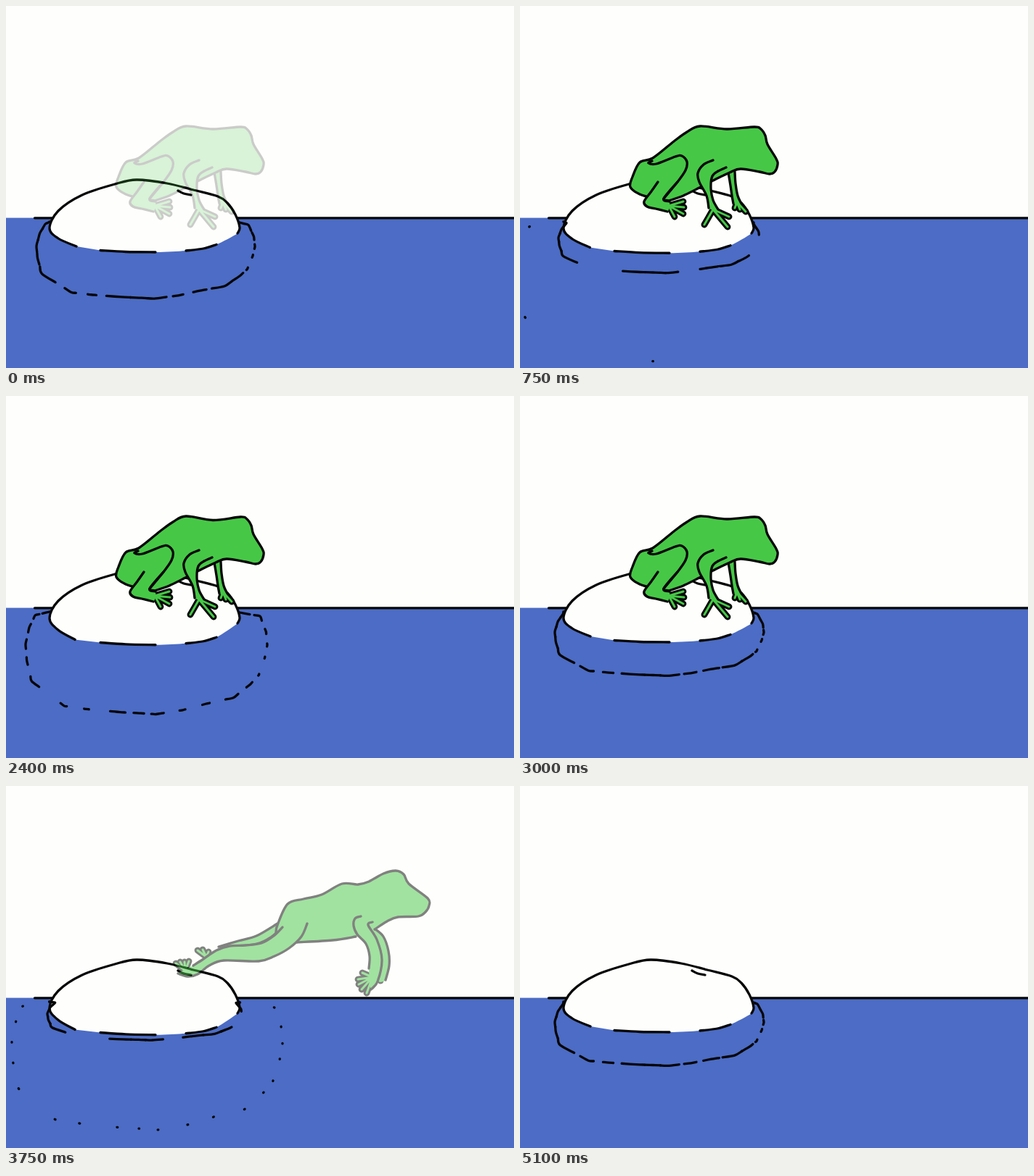
These frames come from a looping animation (700 px wide and 500 px high, 5.25 s). An HTML page:

```html
<!DOCTYPE html>
<html lang="en">
<head>
<meta charset="utf-8">
<title>Frog on a rock</title>
<style>
  html, body { margin: 0; width: 100%; height: 100%; overflow: hidden; background: #fefefc; }
  svg { display: block; width: 700px; height: 500px; }
  path { stroke-linecap: round; stroke-linejoin: round; }
  .ink, .toe, .core { fill: none; stroke: #060606; stroke-width: 3.3; }
  .skin { fill: #46c846; }
  .toe { stroke-width: 8.8; }
  .core { stroke: #46c846; stroke-width: 3; }
</style>
</head>
<body>
<svg id="stage" viewBox="0 0 700 500"></svg>
<script>
const STEP = 150, STEPS = 35, WAVES = 7, TAKEOFF = 24;
const stage = document.getElementById('stage');

function add(parent, tag, attrs = {}) {
  const el = document.createElementNS('http://www.w3.org/2000/svg', tag);
  for (const key in attrs) el.setAttribute(key, attrs[key]);
  return parent.appendChild(el);
}

const points = text => text.trim().split(/\s+/).map(s => s.split(',').map(Number));
const mix = (a, b, t) => a.map((v, i) => v + (b[i] - v) * t);

// Smooth open curve through a list of points.
function curve(p) {
  const at = i => p[Math.max(0, Math.min(p.length - 1, i))];
  let d = 'M' + p[0];
  for (let i = 0; i < p.length - 1; i++) {
    const [a, b, c, e] = [at(i - 1), at(i), at(i + 1), at(i + 2)];
    const h1 = b.map((v, k) => v + (c[k] - a[k]) / 6);
    const h2 = c.map((v, k) => v - (e[k] - b[k]) / 6);
    d += `C${h1} ${h2} ${c}`;
  }
  return d;
}

const ink = (g, p) => add(g, 'path', { class: 'ink', d: curve(p) });
const skin = (g, p) => add(g, 'path', { class: 'skin', d: curve(p) + 'Z' });

// Two edges running from the body outwards, ending in a fan of toes.
function limb(g, edgeA, edgeB, wrist, tips) {
  const a = points(edgeA), b = points(edgeB);
  const fan = points(tips).map(tip => `M${wrist}L${tip}`).join('');
  add(g, 'path', { class: 'toe', d: fan });
  skin(g, [...a, ...b.slice().reverse()]);
  ink(g, a);
  ink(g, b);
  add(g, 'path', { class: 'core', d: fan });
}

// Sea and horizon
add(stage, 'rect', { y: 292.6, width: 700, height: 208, fill: '#4c6cc5' });
add(stage, 'path', { class: 'ink', d: 'M39.5 292.8H702' });

function rock(g, wave) {
  const sink = 5 * Math.cos((wave - 3) * Math.PI / 6) ** 2;
  const top = points(`${97 - sink / 2},${332 + sink * 1.2} 72,${321 + sink * .6} 60,307
    72,283 105,261 150,246 180,240 222,245 258,254 292,263 305,272 316,288 322,306 319,314`);
  const middle = points(`206,${340 + sink} 165,${339.5 + sink * .9} 130,${337.5 + sink * .8}`);
  const right = points(`290,${329.5 + sink} 272,${335 + sink} 248,${338 + sink}`);
  add(g, 'path', { d: curve([...top, ...right, ...middle]) + 'Z', fill: '#fefefc' });
  [top, middle, right, points('237,255 245,259 255,261')].forEach(p => ink(g, p));
}

// Ring outline from the rock's left edge round to its right edge:
// across (-1..1), depth (0..1), and how long its dash lasts.
const ringShape = points(`-.92,.04,1 -.97,.16,1 -1,.32,1 -.99,.48,.7 -.95,.68,.8 -.68,.92,.4
  -.5,.95,.3 -.22,.98,1 -.06,.99,1 .08,1,1 .3,.96,.4 .49,.9,.5 .72,.84,1 .86,.71,.8
  .93,.62,.2 .98,.45,.2 1,.33,.4 .99,.2,.6 .94,.05,1`);

// Dashes shorten to dots as the ring widens.
function ring(g, age) {
  const half = 134 + 4 * age + age * age / 2, depth = 54 + 17.7 * age;
  const marks = ringShape.map(([u, v, w]) => [[191 + age / 2 + u * half, 297 + v * depth], w]);
  marks.unshift([[60, 298], 2]);
  marks.push([[322, 299], 2]);
  marks.forEach(([p, weight], i) => {
    if (age < 2 && weight < .5) return;
    if (age > 7 && (i > 9 || i % 4 !== 1)) return;
    const reach = Math.max(.01, Math.min(.5, weight * (7 - age) / 7));
    const before = marks[i - 1] || marks[i], after = marks[i + 1] || marks[i];
    ink(g, [mix(p, before[0], reach), p, mix(p, after[0], reach)]);
  });
}

const waves = Array.from({ length: WAVES }, (_, wave) => {
  const g = add(stage, 'g');
  rock(g, wave);
  for (let age = (wave + 3) % WAVES; age <= 8; age += WAVES) ring(g, age);
  return g;
});

function sittingFrog(sag) {
  const g = add(stage, 'g');
  limb(g, '287,230 290,248 292,262 294,273', '296,229 297,245 300,262 305,273',
    [299, 271], '296,279 303,281 311,284');
  const body = points(`205,269 186,266 165,260 152,250 155,236 165,216 183,210 212,187
    230,174 248,166 285,${170 + sag} 323,167 332,170 338,179 341,191 353,211 355,219 351,229
    344,232 330,229 304,225 289,230 270,239 247,251 225,262 205,269`);
  skin(g, body);
  ink(g, body);
  limb(g, '190,243 181,256 171,270 175,277 187,280 203,284', '217,243 198,266 206,270',
    [205, 276], '225,270 226,278 225,287 213,291');
  ink(g, points('182,214 177,217 188,218 214,208 223,207 230,215 228,227 217,243 198,266'));
  limb(g, '266,213 253,219 245,231 247,243 257,262 260,279', '284,223 273,228 265,235 263,251 266,268 273,281',
    [266, 281], '254,302 286,305 288,291');
  return g;
}

function leapingFrog() {
  const g = add(stage, 'g');
  limb(g, '374,190 345,207 320,214 293,222', '381,194 366,208 345,218 300,223',
    [276, 236], '264,227 271,226 279,229');
  limb(g, '501,203 514,222 517,245 511,268', '508,197 520,208 527,228 528,248 523,268',
    [515, 262], '516,269');
  const back = points(`372,202 374,192 388,163 410,156 435,150 463,135 485,136 500,132 520,121
    537,117 548,122 555,135 581,155 583,165 578,174 568,180 540,181 525,187 508,198`);
  const belly = points('482,208 450,213 401,216');
  skin(g, [...back, ...belly]);
  ink(g, back);
  ink(g, belly);
  limb(g, '381,195 369,207 352,217 330,220 308,221 290,227 272,239 258,248',
    '415,190 407,208 390,224 370,235 348,242 300,241 280,248 264,260 250,263 237,259',
    [247, 255], '234,245 240,243 246,243 252,242');
  limb(g, '489,180 481,183 479,193 484,205 496,218 501,235 500,252',
    '505,188 499,192 511,212 518,240 512,270 503,281',
    [505, 264], '491,258 485,267 486,274 490,281 497,286');
  return g;
}

const [calm, sagged, leaping] = [sittingFrog(0), sittingFrog(1.5), leapingFrog()];

function pickFrog(step, wave) {
  if (step > TAKEOFF + 2) return null;
  if (step >= TAKEOFF) return leaping;
  return wave > 1 && wave < 5 ? sagged : calm;
}

// The feet stay on the rock while the body stretches, then the frog flies off.
function leapPose(t) {
  const push = Math.min(0, t), fly = Math.max(0, t);
  return `translate(${245 + 110 * fly} ${260 - 8 * fly})
    scale(${1 + .33 * push} ${1 + .13 * push}) translate(-245 -260)`;
}

function show(step) {
  const wave = step % WAVES, frog = pickFrog(step, wave);
  waves.forEach((g, i) => g.style.display = i === wave ? '' : 'none');
  [calm, sagged, leaping].forEach(g => g.style.display = g === frog ? '' : 'none');
  if (!frog) return;
  const fade = frog === leaping ? 1 - (step - TAKEOFF + 1) / 4 : Math.min(1, (step + 1) / 5);
  frog.setAttribute('opacity', fade);
  if (frog === leaping) frog.setAttribute('transform', leapPose(step - TAKEOFF - 1));
}

const start = performance.now();
let shown = -1;

function tick() {
  const step = Math.floor((performance.now() - start) / STEP) % STEPS;
  if (step !== shown) show(shown = step);
  requestAnimationFrame(tick);
}
tick();
</script>
</body>
</html>
```
